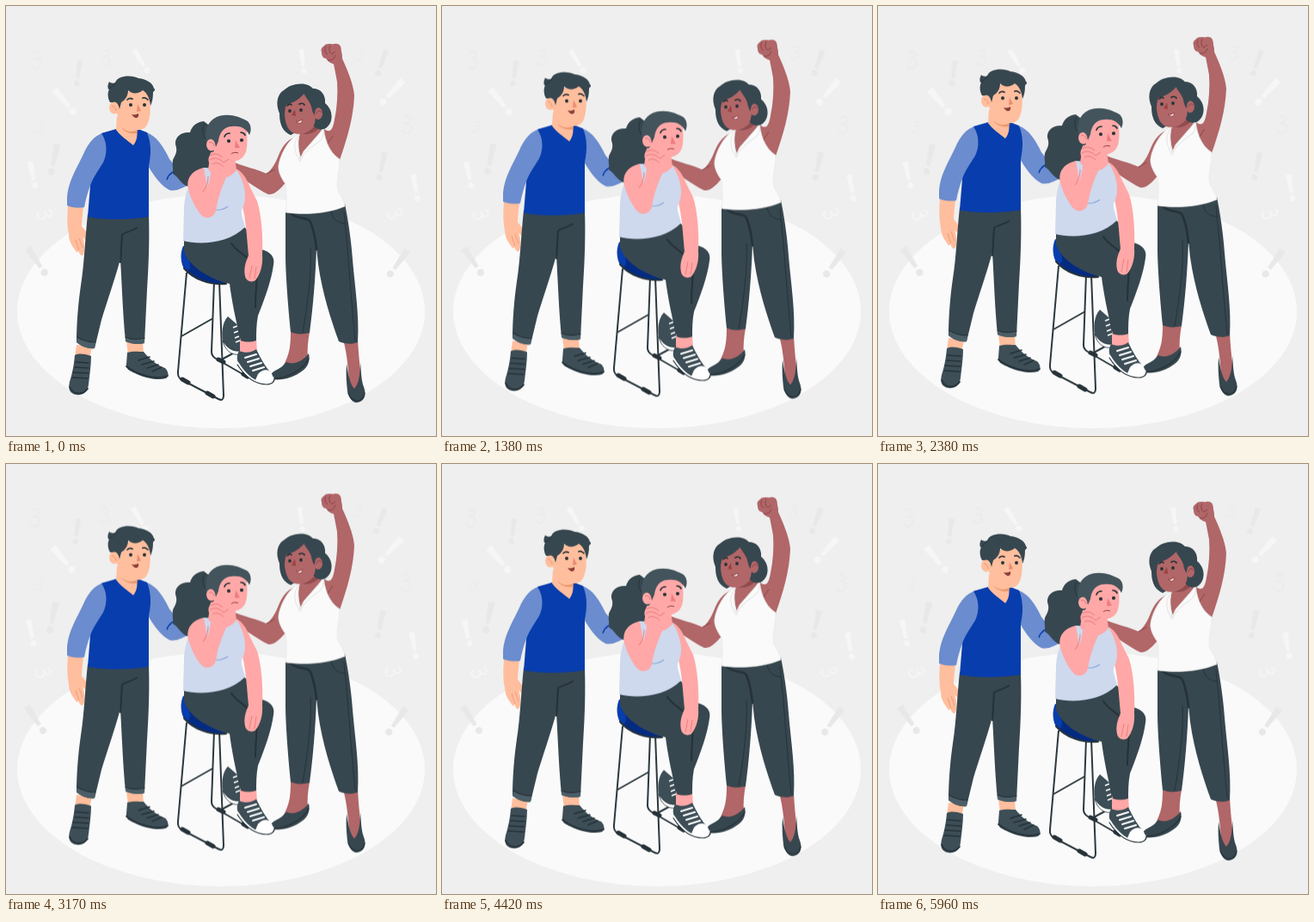
These frames come from a looping animation (500x500 px, 6000 ms). An HTML page:

```html
<!DOCTYPE html>
<html lang="en">
<head>
<meta charset="utf-8">
<title>Supportive friends</title>
<style>
  html, body { margin: 0; width: 100%; height: 100%; overflow: hidden; background: #efefef; }
  svg { display: block; width: 100vw; height: 100vh; }
  #people { animation: float 6s linear infinite; }
  #marks { animation: shake 6s linear infinite; }
  @keyframes float { 50% { transform: translateY(-10px); } }
  @keyframes shake {
    10%, 90% { transform: translateX(-1px); }
    20%, 80% { transform: translateX(2px); }
    30%, 50%, 70% { transform: translateX(-4px); }
    40%, 60% { transform: translateX(4px); }
  }
  .dark { fill: #37474f; }
  .shoe { fill: #3d4e57; }
  .ink { fill: #263238; }
  .blue { fill: #083dad; }
  .sleeve { fill: #6b8cce; }
  .peach { fill: #ffbe9d; }
  .pink { fill: #ffa8a7; }
  .brown { fill: #b16668; }
  .line { fill: none; stroke: #263238; stroke-width: 1.2; stroke-linecap: round; stroke-linejoin: round; }
  .bar { fill: none; stroke: #2b383e; stroke-width: 2; stroke-linejoin: round; }
  .brow { fill: none; stroke: #263238; stroke-width: 1.7; stroke-linecap: round; }
</style>
</head>
<body>
<svg viewBox="0 0 500 500">
  <ellipse cx="250" cy="355" rx="237" ry="136" fill="#fafafa"/>
  <g id="marks"></g>

  <g id="people">
    <!-- man -->
    <g>
      <path class="sleeve" d="M163 147C175 151 183 163 190 178L199 189C205 187 211 188 217 190L215 206C206 212 197 216 190 214C180 209 171 196 164 184Z"/>
      <path d="M187 202C189 195 195 191 204 190" fill="none" stroke="#083dad" stroke-width="1.4"/>
      <path class="peach" d="M72 232L90 233C89 243 88 251 88 256C93 261 97 268 96 273C94 275 91 270 89 268C92 276 92 285 90 289C88 292 85 288 84 284C84 288 81 286 80 283C75 277 73 271 73 265C71 257 71 244 72 232Z"/>
      <path d="M85 270L89 281M81 272L85 284" fill="none" stroke="#ed9275" stroke-width=".8"/>
      <path class="peach" d="M82 394L100 396L97 411L80 409ZM140 390L159 391L160 406L142 406Z"/>
      <path class="shoe" d="M80 406C86 403 93 405 99 407C99 418 97 430 96 440C95 450 88 453 82 452C74 451 72 445 74 437C77 427 79 418 80 406Z"/>
      <path class="shoe" d="M141 403C147 401 155 402 160 402C167 411 176 418 185 421C189 425 190 431 186 433C175 436 160 432 150 427C143 424 139 422 140 416Z"/>
      <path class="line" d="M81 414L96 415M80 420L96 421M78 426L96 427M77 432L95 433M154 412L167 408M158 417L172 413M164 421L177 417M170 425L181 420" style="stroke-width:1.6"/>
      <path class="line" d="M74 443C78 452 89 453 95 445M140 419C151 428 174 436 188 430" style="stroke-width:1.8"/>
      <path class="dark" d="M95 242C115 248 140 248 166 243C167 270 166 300 164 330L161 392C154 394 146 393 139 390C136 360 135 330 133 294C126 320 117 345 111 365L103 398C96 399 88 396 82 391C82 370 84 345 87 325C91 300 92 270 95 242Z"/>
      <path d="M83 385C89 389 97 391 104 391L103 398C96 399 88 396 82 391ZM139 385C146 388 154 388 161 386L161 392C154 394 146 393 139 390Z" fill="#4b5e67"/>
      <path class="line" d="M83 385C89 389 97 391 104 391M139 385C146 388 154 388 161 386"/>
      <path class="line" d="M152 258C144 263 138 263 135 266C134 278 134 288 133 298" style="stroke-width:2"/>
      <path class="sleeve" d="M120 146C103 148 96 160 91 170C83 188 71 205 71 226L71 232C78 235 86 235 91 234C93 224 95 216 98 209L120 175Z"/>
      <path class="blue" d="M128 143L111 148C118 158 118 172 113 182C106 193 100 202 98 209L95 245C110 249 145 249 166 245V186C169 172 169 160 164 147L151 142L148 161Z"/>
      <path class="peach" d="M129 128L128 144C133 151 141 156 148 162C153 156 153 149 152 140Z"/>
      <path d="M134 141C140 147 147 147 153 144L152 148C145 149 138 147 134 141Z" fill="#eb996e"/>
      <path class="peach" d="M131 108C138 100 144 98 150 99C158 95 166 99 167 108C169 122 167 136 162 141C155 147 141 144 134 138L129 125Z"/>
      <ellipse class="peach" cx="126" cy="118" rx="6" ry="7.5"/>
      <path d="M123 116C126 116 128 119 128 122" fill="none" stroke="#eb996e"/>
      <path class="dark" d="M121 112C118 107 118 100 120 97C117 95 119 90 120 88C122 90 125 90 127 89C130 80 147 80 154 84C164 85 171 90 172 96C174 96 173 99 171 100C171 107 170 112 168 116C167 107 164 101 159 98C154 102 147 103 142 98C142 104 139 109 134 112L132 120C131 113 127 110 124 112Z"/>
      <path class="line" d="M128 90C123 94 121 96 119 96" style="stroke-width:.8"/>
      <circle class="ink" cx="145" cy="115" r="2"/><circle class="ink" cx="161" cy="115" r="2"/>
      <path class="brow" d="M141 109C143 107 145 107 147 108M159 107C161 106 163 107 165 109"/>
      <path d="M153 114L157 122L152 123Z" fill="#eb8d70"/>
      <path d="M146 126C149 127 152 126 154 125C155 130 151 133 146 126Z" fill="#8f3d3a"/>
    </g>

    <!-- woman with raised fist -->
    <g>
      <path class="brown" d="M337 152C325 156 320 166 316 176C312 186 307 192 303 195C293 190 277 187 258 179L260 190C275 200 292 213 305 219C312 220 319 213 327 203L337 170Z"/>
      <path class="line" d="M303 195L312 190" style="stroke:#924f52"/>
      <path class="brown" d="M331 378L353 379C351 390 350 400 351 410L335 422L322 419C330 405 331 395 331 378ZM392 388L409 388C410 405 411 415 413 430L406 448L400 446C398 425 397 405 392 388Z"/>
      <path class="dark" d="M352 404C354 412 351 420 345 424C335 432 320 436 311 434C306 432 308 426 313 424C319 421 323 418 326 414C335 418 345 413 352 404ZM396 416C395 428 396 438 397 448C399 457 404 462 409 461C418 459 419 451 416 443C413 435 413 425 412 414C412 428 410 440 405 445C400 440 398 428 396 416Z"/>
      <path class="line" d="M309 433C325 434 345 424 352 410M398 450C402 462 415 462 417 450"/>
      <path class="dark" d="M325 238C345 242 372 241 394 230C398 250 401 270 403 295C406 330 411 360 409 391C402 394 394 393 387 390C378 365 368 335 363 300L361 281C360 315 357 350 353 380C345 382 337 382 331 379C328 350 325 310 325 290Z"/>
      <path class="line" d="M332 242C342 249 351 245 354 251C358 261 360 272 361 283" style="stroke-width:2.6"/>
      <path class="line" d="M354 281C356 310 350 350 345 380M378 239C380 248 385 252 394 253M393 240C398 285 401 340 406 389" style="stroke-width:.9"/>
      <path class="brown" d="M367 140C376 150 380 145 382 132C385 118 386 102 385 88L380 62L390 59C396 72 404 90 405 104C404 130 397 153 388 179C383 182 372 172 367 164Z"/>
      <path class="brown" d="M367 54C365 48 370 47 371 45C375 43 379 45 382 44C388 43 390 47 390 53C392 60 391 66 387 67C382 69 376 67 372 61C369 61 367 58 367 54Z"/>
      <path d="M372 47C370 51 371 55 374 56M377 46C375 50 376 54 379 56L383 53M383 57C382 61 379 64 374 63M371 167C372 161 376 157 380 151" fill="none" stroke="#8a4548"/>
      <path d="M339 150L369 138C370 152 374 169 388 178C388 193 383 205 386 215C390 222 394 228 394 233C373 242 345 243 325 240C327 226 326 214 325 207C319 199 316 191 317 185C319 173 328 155 339 150Z" fill="#fafafa" stroke="#e6e6e6" stroke-width=".6"/>
      <path class="brown" d="M344 142L367 128L369 139C364 153 350 165 343 176C340 168 339 158 341 151Z"/>
      <path d="M341 150C339 159 340 167 342 178L346 169L367 145L368 137C371 143 370 150 366 156L354 165L346 173L342 181C335 170 333 158 341 150Z" fill="#fafafa" stroke="#dedede" stroke-width=".8"/>
      <path d="M344 148C352 147 359 141 362 135L363 143C356 149 350 150 344 148Z" fill="#8f4b4e"/>
      <path class="dark" d="M331 150C320 145 319 136 320 128C313 118 314 103 323 98C331 90 349 87 357 96C368 96 372 106 371 113C381 121 381 136 372 142C365 146 359 142 356 137Z"/>
      <path class="brown" d="M324 113C334 111 341 106 346 101C352 107 358 111 362 118L359 136C356 146 345 151 335 148C325 144 322 128 324 113Z"/>
      <ellipse class="brown" cx="363" cy="125" rx="5" ry="7"/>
      <path d="M361 125C362 121 366 121 367 124" fill="none" stroke="#8a4548"/>
      <path class="dark" d="M344 98C348 106 353 110 355 117C356 122 357 125 359 127C359 122 360 118 364 118C370 119 370 127 366 133C375 130 373 113 366 106Z"/>
      <path class="dark" d="M348 100C342 109 332 113 326 115C322 124 324 139 332 150C323 147 318 139 318 126L317 106L330 96Z"/>
      <circle class="ink" cx="330" cy="122" r="1.9"/><circle class="ink" cx="343" cy="121" r="1.9"/>
      <path class="brow" d="M327 116C329 114 331 114 332 115M341 114C343 113 346 113 347 115"/>
      <path d="M336 120L337 128L332 127Z" fill="#9a4343"/>
      <path d="M337 134C339 135 342 134 344 132C345 136 341 138 337 134Z" fill="#fff" stroke="#8a3538" stroke-width=".8"/>
    </g>

    <!-- stool -->
    <g>
      <path class="bar" d="M242 320L239 402Q239 407 244 410L282 432M249 412L282 394M204 384L241 363"/>
      <path class="bar" d="M210 310L200 425Q199 432 205 435L247 457Q253 460 253 453L248 320"/>
      <path class="line" d="M205 434L212 438M234 450L241 454M247 411L253 414M276 428L281 431" style="stroke-width:5"/>
      <path class="blue" d="M206 279C202 288 203 300 208 307C218 318 238 325 256 323V290Z"/>
      <path d="M212 294C222 306 239 312 257 314L256 323C238 324 220 317 210 308C215 307 215 301 212 294Z" fill="#042b82"/>
      <path class="line" d="M207 305C218 318 238 325 256 323" style="stroke-width:2"/>
    </g>

    <!-- seated woman -->
    <g>
      <path class="shoe" d="M258 361C251 368 250 383 253 392C258 401 266 406 272 404L274 375Z"/>
      <path d="M252 389C257 398 264 402 272 401V405C263 407 254 400 252 389Z" fill="#fff" stroke="#263238" stroke-width=".8"/>
      <path d="M264 374L269 372M265 380L270 378M266 386L271 384M267 391L272 389" stroke="#fff" stroke-width="1.6"/>
      <path class="pink" d="M272 386L291 386L292 404L272 404Z"/>
      <path class="shoe" d="M271 401C268 406 268 412 271 417C279 429 289 439 303 439C311 439 313 433 309 428C302 420 296 410 291 399C286 403 278 404 271 401Z"/>
      <path d="M293 428C297 423 303 422 307 425C312 430 312 438 304 439C299 439 294 438 290 435Z" fill="#fff"/>
      <path d="M269 414C278 429 290 439 303 439C309 439 312 436 311 431" fill="none" stroke="#fff" stroke-width="2"/>
      <path class="line" d="M269 417C278 431 290 440 303 440C310 440 313 436 312 431"/>
      <path d="M278 409L291 405M281 414L294 410M284 419L297 415M287 424L300 420" stroke="#fff" stroke-width="2" stroke-linecap="round"/>
      <path class="dark" d="M207 270C225 278 255 272 274 255C284 261 290 274 297 283C308 286 313 292 311 301C309 318 301 340 293 360C291 370 291 380 291 389C285 391 278 391 273 389C267 365 262 340 260 323C238 318 212 303 207 285Z"/>
      <path class="line" d="M262 276C269 287 285 293 291 304C293 315 290 330 290 350" style="stroke-width:2"/>
      <path class="dark" d="M230 134C221 135 216 140 214 147C204 146 196 152 197 161C200 169 197 173 194 179C193 186 195 192 194 195C201 199 203 207 212 210C222 206 226 197 237 190L248 148Z"/>
      <path class="pink" d="M264 188C274 190 280 201 284 211L292 227C297 243 299 267 298 290C299 300 296 312 290 319C286 322 279 320 278 314C276 305 279 297 282 290C280 270 279 245 274 230Z"/>
      <path d="M286 302L283 317M291 303L289 317" fill="none" stroke="#e87578" stroke-width=".8"/>
      <path d="M230 188C217 195 208 214 207 236L206 273C224 278 258 277 278 257C276 248 273 243 274 237C281 226 279 207 268 190Z" fill="#ced9ee"/>
      <path d="M243 237C249 238 254 236 258 233" fill="none" stroke="#90a9da" stroke-width="1.2"/>
      <path class="pink" d="M238 170L235 190C244 201 258 204 268 191L266 176Z"/>
      <ellipse class="pink" cx="239" cy="161" rx="6" ry="7.5"/>
      <path class="pink" d="M242 150C249 136 276 135 280 146C281 160 281 172 274 177C265 184 248 181 242 174Z"/>
      <path d="M236 159C239 157 242 160 242 163" fill="none" stroke="#e87578"/>
      <path d="M233 159C230 146 234 134 245 129C257 124 271 128 281 134C286 139 285 146 283 150C279 142 272 139 263 140C254 140 248 147 247 157L244 164C243 156 239 152 234 157Z" fill="#43545c"/>
      <path class="line" d="M231 137C228 142 228 149 232 154" style="stroke-width:.8"/>
      <circle class="ink" cx="259" cy="157" r="2.1"/><circle class="ink" cx="274" cy="156" r="2.1"/>
      <path class="brow" d="M254 152C255 149 258 148 260 148M273 147C275 147 277 148 278 150"/>
      <path d="M267 156L272 165L266 165Z" fill="#ee7c80"/>
      <path d="M262 172C264 170 267 170 270 171" fill="none" stroke="#8c3d42"/>
      <path class="pink" d="M230 188C216 191 209 201 212 213C215 225 221 236 227 243C233 249 242 246 244 238C246 224 251 210 259 193C263 190 266 185 265 181C264 178 260 180 258 178C260 174 256 172 252 170C249 165 243 167 239 171C235 175 234 180 238 186C239 193 237 203 234 211Z"/>
      <path d="M238 174C244 170 248 173 252 176M237 179C243 175 249 178 253 182L259 178M240 184C244 181 249 183 253 187M235 198C235 205 233 211 229 216" fill="none" stroke="#e87578" stroke-width=".9"/>
    </g>
  </g>
</svg>
<script>
  const pale = "#f6f6f6", grey = "#e8e8e8", faint = "#ebebeb";
  // x, y, tilt in degrees, scale, colour
  const bangs = [
    [68, 111, -40, 1.15, pale], [84, 78, 8, .9, grey], [157, 64, -32, .95, pale],
    [345, 64, -8, .85, pale], [437, 66, 20, .95, grey], [449, 100, 42, 1.15, pale],
    [476, 211, -10, .95, pale], [31, 196, -12, .95, pale], [56, 178, 12, 1.1, grey],
    [36, 297, -34, 1.15, grey], [456, 299, 36, 1.15, grey], [437, 186, 12, 1, grey]
  ];
  const curls = [
    [36, 63, 0, .9, faint], [117, 60, 0, .8, faint], [40, 141, 20, .6, faint],
    [411, 55, 10, .7, faint], [467, 138, 0, .9, faint],
    [45, 243, 70, .8, pale], [452, 242, 70, .8, pale]
  ];
  const place = ([x, y, tilt, size]) => `transform="translate(${x} ${y}) rotate(${tilt}) scale(${size})"`;
  const bang = m => `<g ${place(m)} fill="${m[4]}"><path d="M-3.5-16H3.5L2 7H-2Z"/><circle cy="13.5" r="3.6"/></g>`;
  const curl = m => `<path ${place(m)} fill="none" stroke="${m[4]}" stroke-width="2"
    d="M-5-8C0-15 7-9 3-4C0-1-4-2-4-2C4-3 7 4 3 9C-1 13-7 10-6 6"/>`;
  document.getElementById("marks").innerHTML = bangs.map(bang).join("") + curls.map(curl).join("");
</script>
</body>
</html>
```
